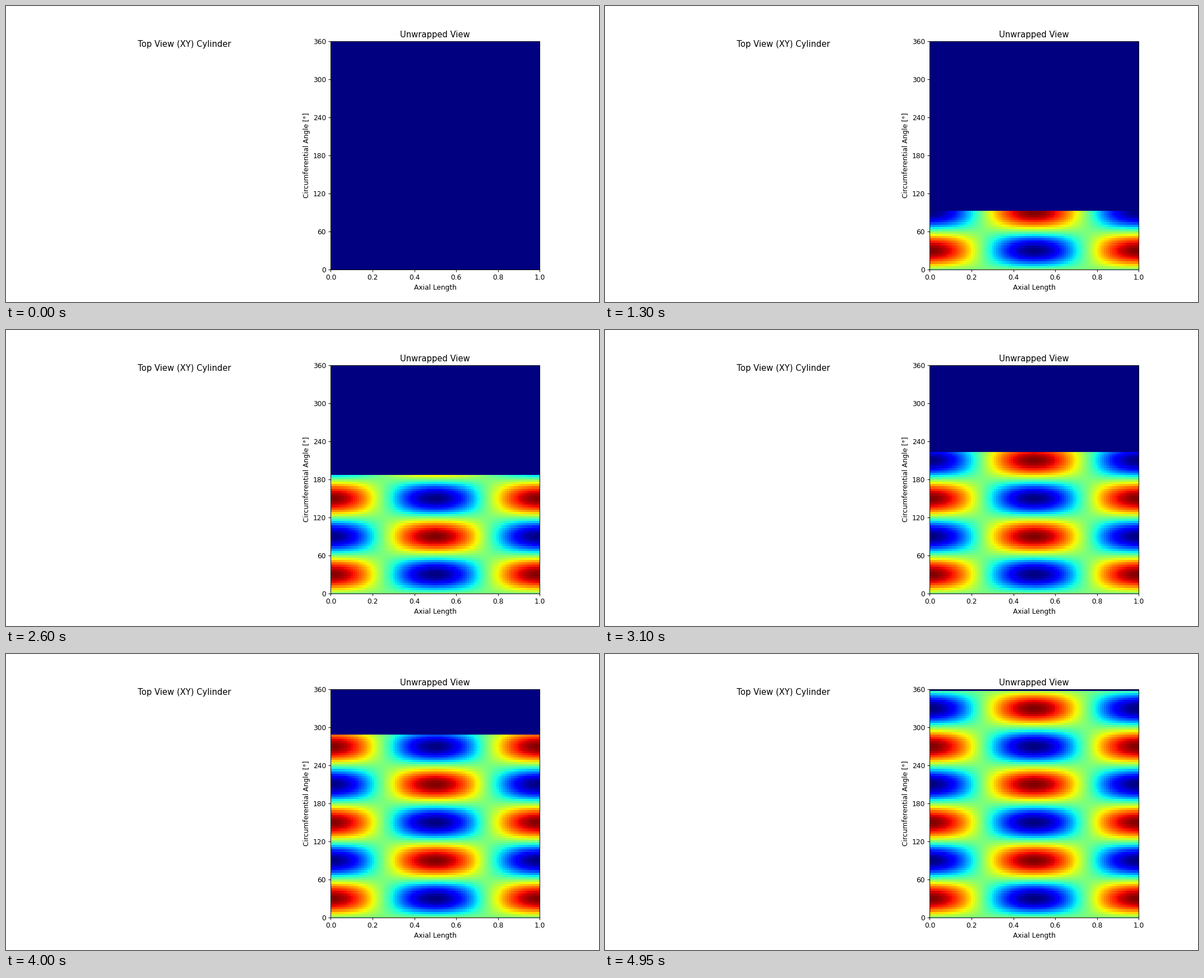
These frames come from a looping animation (1058 by 529 pixels, 5000 ms). A matplotlib script:

```python
import numpy as np
import matplotlib.pyplot as plt
from matplotlib.animation import FuncAnimation

WIDTH_PX = 1058
WIDTH_IN, HEIGHT_IN = 12, 6
STEPS = 100
INTERVAL = 50  # ms

plt.rcParams["font.family"] = "DejaVu Sans"

length = np.linspace(0, 1, STEPS)
angle = np.linspace(0, 360, STEPS)
field = np.sin(3 * np.radians(angle))[:, None] * np.cos(2 * np.pi * length)

fig, (top_ax, flat_ax) = plt.subplots(1, 2, figsize=(WIDTH_IN, HEIGHT_IN),
                                      dpi=WIDTH_PX / WIDTH_IN)

top_ax.set_aspect("equal")
top_ax.set_title("Top View (XY) Cylinder")
top_ax.axis("off")

mesh = flat_ax.pcolormesh(length, angle, np.full_like(field, -1),
                          cmap="jet", vmin=-1, vmax=1, shading="nearest")
flat_ax.set(title="Unwrapped View", xlabel="Axial Length",
            ylabel="Circumferential Angle [°]",
            xlim=(0, 1), ylim=(0, 360), yticks=range(0, 361, 60))


def update(step):
    # Rows below the sweep show the field, the rest stay at the minimum.
    revealed = np.arange(STEPS)[:, None] < step
    mesh.set_array(np.where(revealed, field, -1))
    return (mesh,)


anim = FuncAnimation(fig, update, frames=STEPS, interval=INTERVAL,
                     repeat=True, repeat_delay=0)
plt.show()
```
